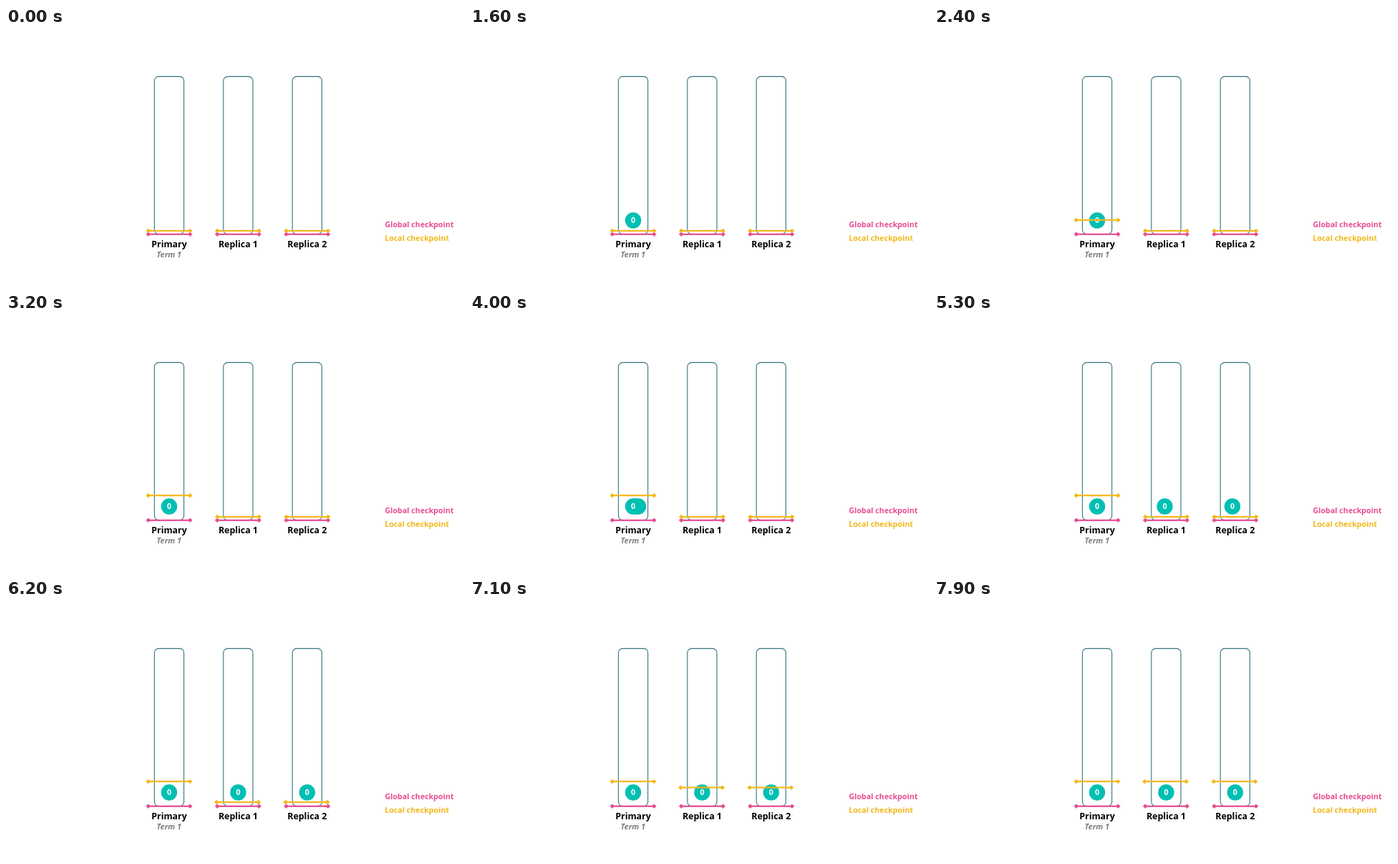
An HTML page with a canvas for the animation above (8 s loop, 640x360 px).

```html
<!DOCTYPE html>
<html lang="en">
<head>
<meta charset="utf-8">
<title>Checkpoints</title>
<style>
html, body { margin: 0; width: 100%; height: 100%; overflow: hidden; background: #fff; }
canvas { display: block; width: 640px; height: 360px; }
</style>
</head>
<body>
<canvas id="stage" width="640" height="360"></canvas>
<script>
const ctx = document.getElementById('stage').getContext('2d');
const LOOP = 8000;
const PINK = '#e64d92', GOLD = '#f3b81b', TEAL = '#00bfb3', EDGE = '#35737f';
const COLS = [228, 324.4, 420.8];
const NAMES = ['Primary', 'Replica 1', 'Replica 2'];
const LOW = 283, HIGH = 253.2, DOC_Y = 268.5;

// Eased progress from 0 to 1 between two times
function ease(t, start, end) {
  const p = Math.min(1, Math.max(0, (t - start) / (end - start)));
  return (1 - Math.cos(Math.PI * p)) / 2;
}

function text(str, x, y, size, color, align = 'center', style = '') {
  ctx.font = `${style} bold ${size}px "Open Sans", "Noto Sans", sans-serif`;
  ctx.textAlign = align;
  ctx.fillStyle = color;
  ctx.fillText(str, x, y);
}

function bar(x) {
  ctx.strokeStyle = EDGE;
  ctx.lineWidth = 1.1;
  ctx.beginPath();
  ctx.roundRect(x - 20.6, 67.6, 41.2, 220, 6);
  ctx.stroke();
}

function doc(x) {
  ctx.fillStyle = TEAL;
  ctx.beginPath();
  ctx.arc(x, DOC_Y, 11.2, 0, 2 * Math.PI);
  ctx.fill();
  text('0', x, 272.3, 10.6, '#fff');
}

function diamond(x, y) {
  const r = 3.3;
  ctx.beginPath();
  ctx.moveTo(x - r, y);
  ctx.lineTo(x, y - r);
  ctx.lineTo(x + r, y);
  ctx.lineTo(x, y + r);
  ctx.fill();
}

function marker(x, y, color) {
  const half = 29.2;
  ctx.fillStyle = color;
  ctx.fillRect(x - half, y - 1.1, 2 * half, 2.2);
  diamond(x - half, y);
  diamond(x + half, y);
}

function draw(t) {
  ctx.fillStyle = '#fff';
  ctx.fillRect(0, 0, 640, 360);
  COLS.forEach(bar);

  const sent = ease(t, 3800, 5450);
  if (sent > 0) {
    for (const x of COLS.slice(1)) doc(COLS[0] + (x - COLS[0]) * sent);
  }
  ctx.globalAlpha = ease(t, 600, 1200);
  doc(COLS[0]);
  ctx.globalAlpha = 1;

  COLS.forEach((x, i) => {
    const rise = i ? ease(t, 6010, 7710) : ease(t, 1700, 3100);
    const shift = i && rise > 0 ? -0.9 : 0;
    marker(x, 287.8, PINK);
    marker(x + shift, LOW + (HIGH - LOW) * rise, GOLD);
    text(NAMES[i], x, 305.6, 12.4, '#000');
  });

  text('Term 1', 227.8, 319.5, 11, '#7d7d7d', 'center', 'italic');
  text('Global checkpoint', 529.5, 278, 10.7, PINK, 'left');
  text('Local checkpoint', 529.2, 297, 10.7, GOLD, 'left');
}

const begin = performance.now();
function frame() {
  draw((performance.now() - begin) % LOOP);
  requestAnimationFrame(frame);
}
frame();
</script>
</body>
</html>
```
